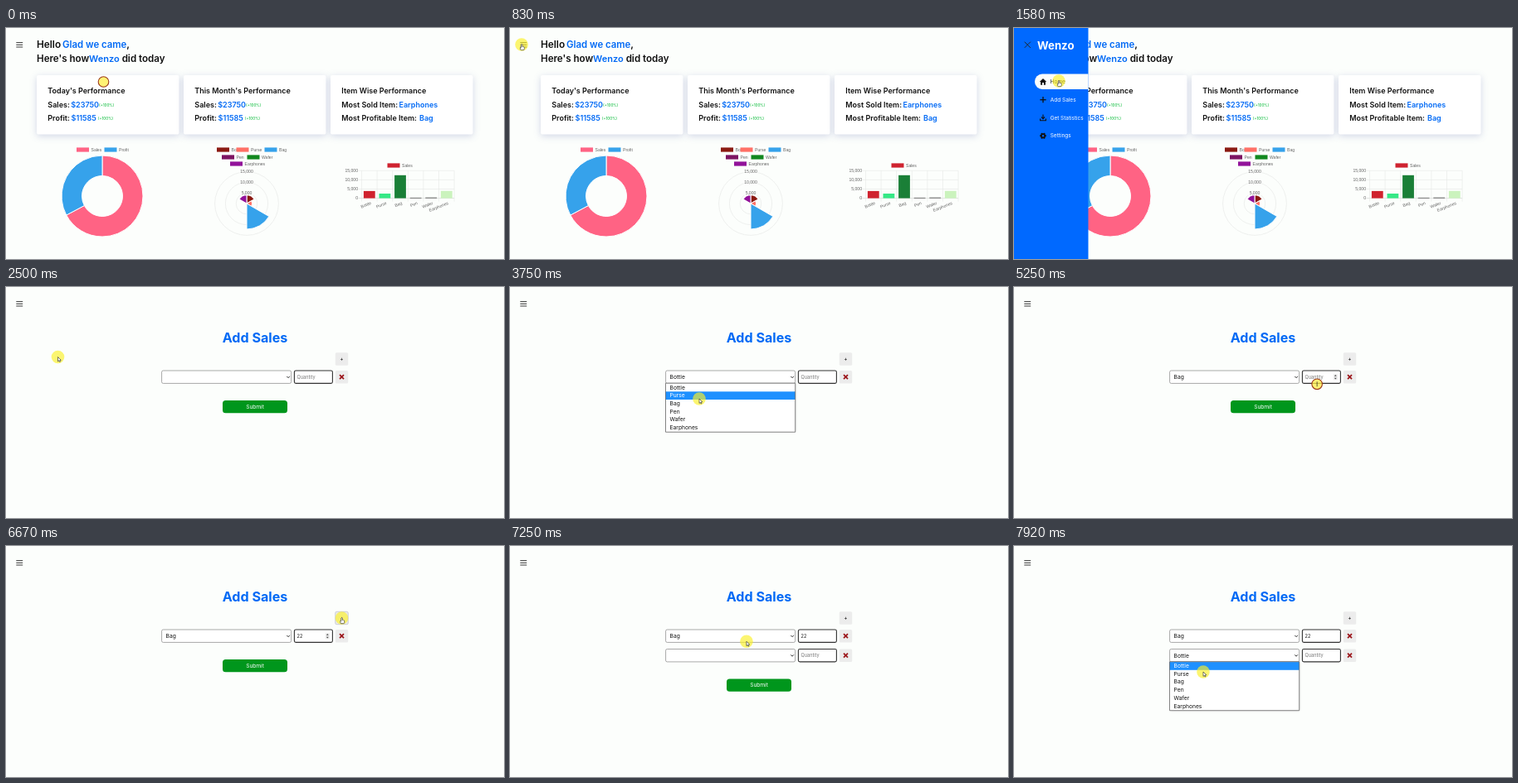
Recreate the animation shown at these times as an HTML page with a canvas. Size 600 by 279 pixels, loop 8000 ms.

```html
<!DOCTYPE html>
<html lang="en">
<head>
<meta charset="utf-8">
<title>Sales dashboard</title>
<style>
html, body { margin: 0; width: 100%; height: 100%; overflow: hidden; background: #fcfefc; }
canvas { display: block; width: 100%; height: 100%; }
</style>
</head>
<body>
<canvas id="stage"></canvas>
<script>
const W = 600, H = 279, LOOP = 8000, STEP = 1000 / 12;
const BLUE = '#0069f5', INK = '#111', BG = '#fcfefc';
const UI = 'Inter, "Open Sans", sans-serif';
const CHART = '"Liberation Sans", Arial, sans-serif';
const SHOP = 'Glad we came', USER = 'Wenzo';
const ITEMS = ['Bottle', 'Purse', 'Bag', 'Pen', 'Wafer', 'Earphones'];

const canvas = document.getElementById('stage');
const ctx = canvas.getContext('2d');

// Pointer path: time, x, y
const PATH = [
  [0, 117.5, 65], [80, 117.5, 65], [830, 14, 20], [1200, 14, 20], [1580, 54, 64],
  [1830, 54, 64], [2250, 62.5, 84.5], [2510, 62.5, 84.5], [2920, 200, 110],
  [3080, 200, 110], [3170, 222, 111], [3410, 222, 111], [3750, 228, 135],
  [4000, 225, 152], [4170, 221, 150], [4330, 218.5, 146], [4500, 216, 141],
  [4660, 216, 141], [5000, 360, 116], [5420, 368, 118], [5580, 352, 119],
  [6080, 352, 119], [6580, 404.5, 87], [7000, 404.5, 87], [7420, 218, 131],
  [7580, 214, 133], [7750, 212, 138], [7920, 228, 152], [8000, 228, 152]
];
const CLICKS = [0, 1000, 2330, 3330, 4580, 5250, 6830, 7500];
// Highlighted option: start time, index
const HOVER_A = [[3400, 0], [3660, 1], [3830, 2], [3910, 3], [4080, 3], [4410, 2]];

const ease = p => p * p * (3 - 2 * p);
const clamp = v => Math.max(0, Math.min(1, v));

function pointerAt(t) {
  let i = 1;
  while (i < PATH.length - 1 && PATH[i][0] < t) i++;
  const [t0, x0, y0] = PATH[i - 1], [t1, x1, y1] = PATH[i];
  const p = ease(clamp((t - t0) / (t1 - t0)));
  return [x0 + (x1 - x0) * p, y0 + (y1 - y0) * p];
}

function text(s, x, y, size, color = INK, weight = 400, align = 'left', family = UI) {
  ctx.font = `${weight} ${size}px ${family}`;
  ctx.fillStyle = color;
  ctx.textAlign = align;
  ctx.fillText(s, x, y);
}

function rect(x, y, w, h, color) {
  ctx.fillStyle = color;
  ctx.fillRect(x, y, w, h);
}

function box(x, y, w, h, r, fill, stroke, lw = 0.7) {
  ctx.beginPath();
  ctx.roundRect(x, y, w, h, r);
  if (fill) { ctx.fillStyle = fill; ctx.fill(); }
  if (stroke) { ctx.strokeStyle = stroke; ctx.lineWidth = lw; ctx.stroke(); }
}

function line(points, color, lw = 1) {
  ctx.beginPath();
  points.forEach(([x, y]) => ctx.lineTo(x, y));
  ctx.strokeStyle = color;
  ctx.lineWidth = lw;
  ctx.stroke();
}

function cross(x, y, r, color, lw) {
  line([[x - r, y - r], [x + r, y + r]], color, lw);
  line([[x + r, y - r], [x - r, y + r]], color, lw);
}

function disc(x, y, r, fill, stroke, lw) {
  ctx.beginPath();
  ctx.arc(x, y, r, 0, Math.PI * 2);
  if (fill) { ctx.fillStyle = fill; ctx.fill(); }
  if (stroke) { ctx.strokeStyle = stroke; ctx.lineWidth = lw; ctx.stroke(); }
}

// Angles in turns, clockwise from the top
function slice(x, y, r0, r1, from, to, fill) {
  const a = from * Math.PI * 2 - Math.PI / 2, b = to * Math.PI * 2 - Math.PI / 2;
  ctx.beginPath();
  ctx.arc(x, y, r1, a, b);
  if (r0) ctx.arc(x, y, r0, b, a, true);
  else ctx.lineTo(x, y);
  ctx.closePath();
  ctx.fillStyle = fill;
  ctx.fill();
  ctx.strokeStyle = '#fff';
  ctx.lineWidth = 1;
  ctx.stroke();
}

const small = (s, x, y, align) => text(s, x, y, 5.1, '#666', 400, align, CHART);

function legend(s, x, y, color) {
  rect(x, y - 2.6, 15, 5.2, color);
  small(s, x + 17.5, y + 1.9);
}

function card(x) {
  ctx.save();
  ctx.shadowColor = 'rgba(90,100,170,.26)';
  ctx.shadowBlur = 9 * canvas.width / W;
  ctx.shadowOffsetY = 2 * canvas.width / W;
  box(x, 57, 171.5, 71.5, 2, '#fff');
  ctx.restore();
}

function report(x, title) {
  card(x);
  const row = (name, value, dx, gx, y) => {
    text(name, x + 13.3, y, 9, INK, 600);
    text(value, x + dx, y, 9, BLUE, 600);
    text('(+100%)', x + gx, y - 0.6, 4.5, '#1fc14b', 500);
  };
  text(title, x + 13.3, 79, 9, INK, 600);
  row('Sales:', '$23750', 41.2, 75, 95.5);
  row('Profit:', '$11585', 41.6, 73.8, 111.5);
}

function doughnut() {
  legend('Sales', 85, 147, '#ff6384');
  legend('Profit', 118.5, 147, '#36a2eb');
  const share = 23750 / (23750 + 11585);
  slice(116, 203, 24.5, 49, 0, share, '#ff6384');
  slice(116, 203, 24.5, 49, share, 1, '#36a2eb');
}

function polar() {
  const x = 290, y = 212;
  legend('Bottle', 254, 147, '#8b1a12');
  legend('Purse', 277.5, 147, '#ff7066');
  legend('Bag', 311.5, 147, '#36a2eb');
  legend('Pen', 260, 156, '#7d1463');
  legend('Wafer', 290.5, 156, '#12881f');
  legend('Earphones', 270, 164, '#92129a');
  [12.8, 25.6, 38.4].forEach(r => disc(x, y, r, null, '#e4e6e4', 0.6));
  const radii = [10.3, 6.6, 31, 0.7, 0.7, 10.3];
  const colors = ['#8b1a12', '#ff7066', '#36a2eb', '#7d1463', '#12881f', '#92129a'];
  radii.forEach((r, i) => slice(x, y, 0, r, i / 6, (i + 1) / 6, colors[i]));
  ['5,000', '10,000', '15,000'].forEach((s, i) => {
    const ly = y - 12.8 * (i + 1);
    rect(x - 8.5, ly - 3.2, 17, 6.2, 'rgba(253,254,253,.8)');
    small(s, x, ly + 1.5, 'center');
  });
}

function bars() {
  const x0 = 428.5, base = 205.6, step = 18.6;
  legend('Sales', 459.5, 166, '#cf2430');
  ['0', '5,000', '10,000', '15,000'].forEach((s, i) => {
    const y = base - i * 11.1;
    line([[x0 - 4, y], [x0 + step * 6, y]], i ? '#e6e8e6' : '#cfd1cf', 0.6);
    small(s, x0 - 4.5, y + 1.8, 'right');
  });
  const tops = [8.7, 5.6, 27.8, 0.7, 0.9, 8.8];
  const colors = ['#d0222e', '#35e886', '#1a7f37', '#444', '#555', '#cbf3bd'];
  for (let i = 0; i <= 6; i++) {
    const x = x0 + i * step;
    line([[x, base - 33.3], [x, base + 4]], '#e6e8e6', 0.6);
    if (i === 6) break;
    rect(x + 2.4, base - tops[i], 13.8, tops[i], colors[i]);
    ctx.save();
    ctx.translate(x + step / 2 + 2.6, base + 7.2);
    ctx.rotate(-0.38);
    small(ITEMS[i], 0, 0, 'right');
    ctx.restore();
  }
}

function burger() {
  [17.6, 20.3, 23].forEach(y => line([[12.3, y], [20.2, y]], '#222', 0.9));
}

function dashboard() {
  text('Hello', 37, 24, 11.8, INK, 600);
  text(SHOP, 68, 24, 11.4, BLUE, 600);
  text(',', 68 + ctx.measureText(SHOP).width, 24, 11.8, INK, 600);
  text("Here's how", 37, 41, 11.6, INK, 600);
  text(USER, 100, 41, 11, BLUE, 600);
  text('did today', 100 + ctx.measureText(USER).width + 3, 41, 11.6, INK, 600);

  report(37, "Today's Performance");
  report(214, "This Month's Performance");
  card(391);
  text('Item Wise Performance', 404.3, 79, 9, INK, 600);
  text('Most Sold Item:', 404.3, 95.5, 9, INK, 600);
  text('Earphones', 473.5, 95.5, 9, BLUE, 600);
  text('Most Profitable Item:', 404.3, 111.5, 9, INK, 600);
  text('Bag', 498, 111.5, 9, BLUE, 600);

  doughnut();
  polar();
  bars();
}

function homeIcon(x, y) {
  ctx.beginPath();
  [[-4.2, 0], [0, -4], [4.2, 0], [2.9, 0], [2.9, 3.8], [0.9, 3.8], [0.9, 1],
   [-0.9, 1], [-0.9, 3.8], [-2.9, 3.8], [-2.9, 0]].forEach(([a, b]) => ctx.lineTo(x + a, y + b));
  ctx.fillStyle = INK;
  ctx.fill();
}

function saveIcon(x, y) {
  line([[x, y - 3.8], [x, y + 1]], INK, 1.1);
  line([[x - 2, y - 0.9], [x, y + 1.2], [x + 2, y - 0.9]], INK, 1.1);
  line([[x - 3.4, y + 1], [x - 3.4, y + 3.4], [x + 3.4, y + 3.4], [x + 3.4, y + 1]], INK, 1.1);
}

function gearIcon(x, y) {
  for (let i = 0; i < 3; i++) {
    const a = i * Math.PI / 3, c = Math.cos(a) * 3.8, s = Math.sin(a) * 3.8;
    line([[x - c, y - s], [x + c, y + s]], INK, 2);
  }
  disc(x, y, 2.1, '#0069ff', INK, 1.7);
}

function sidebar(open) {
  if (open <= 0) return;
  ctx.save();
  ctx.translate(89.5 * (open - 1), 0);
  rect(0, 0, 89.5, H, '#0069ff');
  cross(16.3, 20.3, 3.6, '#222', 0.9);
  text(USER, 28, 25.5, 13.2, '#fff', 700);
  box(25, 55.5, 64.5, 18.5, [9, 0, 0, 9], BG);
  homeIcon(35, 65);
  text('Home', 43.7, 67.2, 6.5);
  line([[31.4, 86.7], [38.6, 86.7]], INK, 1.3);
  line([[35, 83.1], [35, 90.3]], INK, 1.3);
  text('Add Sales', 43.7, 89, 6.5, '#fff');
  saveIcon(35, 108.4);
  text('Get Statistics', 43.7, 110.7, 6.4, '#fff');
  gearIcon(35, 130.2);
  text('Settings', 43.7, 132.4, 6.5, '#fff');
  ctx.restore();
}

function saleRow(y, item, count, spinner) {
  box(187.6, y, 156, 15.4, 1.8, '#fff', '#858585');
  text(item, 192.5, y + 10.1, 6.7);
  line([[338.3, y + 6.9], [340.1, y + 8.7], [341.9, y + 6.9]], INK, 0.9);
  box(347.4, y, 46, 15.4, 1.8, '#fff', '#333', 1.1);
  text(count || 'Quantity', 350.6, y + 9.8, 5.5, count ? INK : '#777');
  if (spinner) {
    rect(384.8, y + 4.2, 5, 7.2, '#ececec');
    ctx.fillStyle = '#444';
    [-1, 1].forEach(d => {
      ctx.beginPath();
      ctx.moveTo(385.9, y + 7.8 + d * 1);
      ctx.lineTo(388.7, y + 7.8 + d * 1);
      ctx.lineTo(387.3, y + 7.8 + d * 2.7);
      ctx.fill();
    });
  }
  box(396.8, y, 15.4, 15.4, 1.5, '#ececec');
  cross(404.5, y + 7.7, 2.5, '#9c171c', 1.8);
}

function dropdown(y, active) {
  const h = 9.7;
  ctx.save();
  ctx.shadowColor = 'rgba(0,0,0,.25)';
  ctx.shadowBlur = 3 * canvas.width / W;
  rect(187.5, y, 156.2, h * 6 + 0.8, '#fff');
  ctx.restore();
  rect(187.5, y + 0.4 + h * active, 156.2, h, '#1e90ff');
  ITEMS.forEach((s, i) => text(s, 192.5, y + 7.3 + h * i, 6.7, i === active ? '#fff' : INK));
  box(187.5, y, 156.2, h * 6 + 0.8, 0, null, '#555', 0.7);
}

function salesForm(t) {
  const two = t >= 6990, openA = t >= 3400 && t < 4650, openB = t >= 7560;
  text('Add Sales', 300, 66.6, 16.1, BLUE, 700, 'center');
  const hot = t >= 6500 && t < 7060;
  box(396.8, 79.3, 15.4, 15.4, 1.5, '#ececec', hot ? '#b9bccb' : null);
  text('+', 404.5, 89.2, 6.6, INK, 400, 'center');

  const item = t < 3400 ? '' : t < 4650 ? 'Bottle' : 'Bag';
  saleRow(101, item, t >= 5820 ? '22' : '', t >= 5070 && t < 6990);
  if (two) saleRow(124.5, openB ? 'Bottle' : '', '', false);

  const sy = two ? 160.4 : 136.9;
  box(261, sy, 78, 15.4, 3.6, '#00961c');
  text('Submit', 300, sy + 10, 6.6, '#fff', 400, 'center');

  if (openA) dropdown(116.2, HOVER_A.filter(k => k[0] <= t).pop()[1]);
  if (openB) dropdown(139.7, 0);
}

function arrow(x, y) {
  ctx.beginPath();
  [[0, 0], [0, 5.4], [1.3, 4.3], [2.1, 6], [3, 5.6], [2.2, 4], [3.8, 3.8]]
    .forEach(([a, b]) => ctx.lineTo(x + a, y + b));
  ctx.closePath();
  ctx.fillStyle = '#fff';
  ctx.fill();
  ctx.strokeStyle = '#222';
  ctx.lineWidth = 0.6;
  ctx.stroke();
}

function hand(x, y) {
  box(x - 1.6, y + 2.6, 4.8, 4, 1.2, '#fff', '#222', 0.6);
  box(x - 0.6, y - 0.4, 1.5, 4.6, 0.7, '#fff', '#222', 0.6);
  rect(x - 0.3, y + 2.8, 2.6, 2, '#fff');
}

function pointer(t) {
  const [x, y] = pointerAt(t);
  const pressed = CLICKS.some(c => t >= c - 5 && t < c + 80);
  if (pressed) {
    disc(x, y, 6.3, 'rgba(255,238,70,.75)', '#9c3a1c', 1.1);
    if (t < 80) return;
  } else {
    disc(x, y, 7.8, 'rgba(250,240,40,.66)');
  }
  const onLink = (t > 700 && t < 2420) || (t > 6500 && t < 7060);
  const onField = t > 4950 && t < 6170;
  if (onLink) hand(x, y);
  else if (onField) line([[x, y - 3], [x, y + 3]], '#222', 0.7);
  else arrow(x, y);
}

function draw(t) {
  const k = canvas.width / W;
  ctx.setTransform(k, 0, 0, canvas.height / H, 0, 0);
  rect(0, 0, W, H, BG);
  if (t < 2410) {
    dashboard();
    burger();
    sidebar(ease(clamp((t - 990) / 330)));
  } else {
    burger();
    salesForm(t);
  }
  pointer(t);
}

function resize() {
  const dpr = window.devicePixelRatio || 1;
  canvas.width = Math.round(innerWidth * dpr);
  canvas.height = Math.round(innerHeight * dpr);
}

const start = performance.now();
function tick() {
  const t = (performance.now() - start) % LOOP;
  draw(Math.floor((t + 5) / STEP) * STEP % LOOP);
  requestAnimationFrame(tick);
}

addEventListener('resize', resize);
resize();
tick();
</script>
</body>
</html>
```
